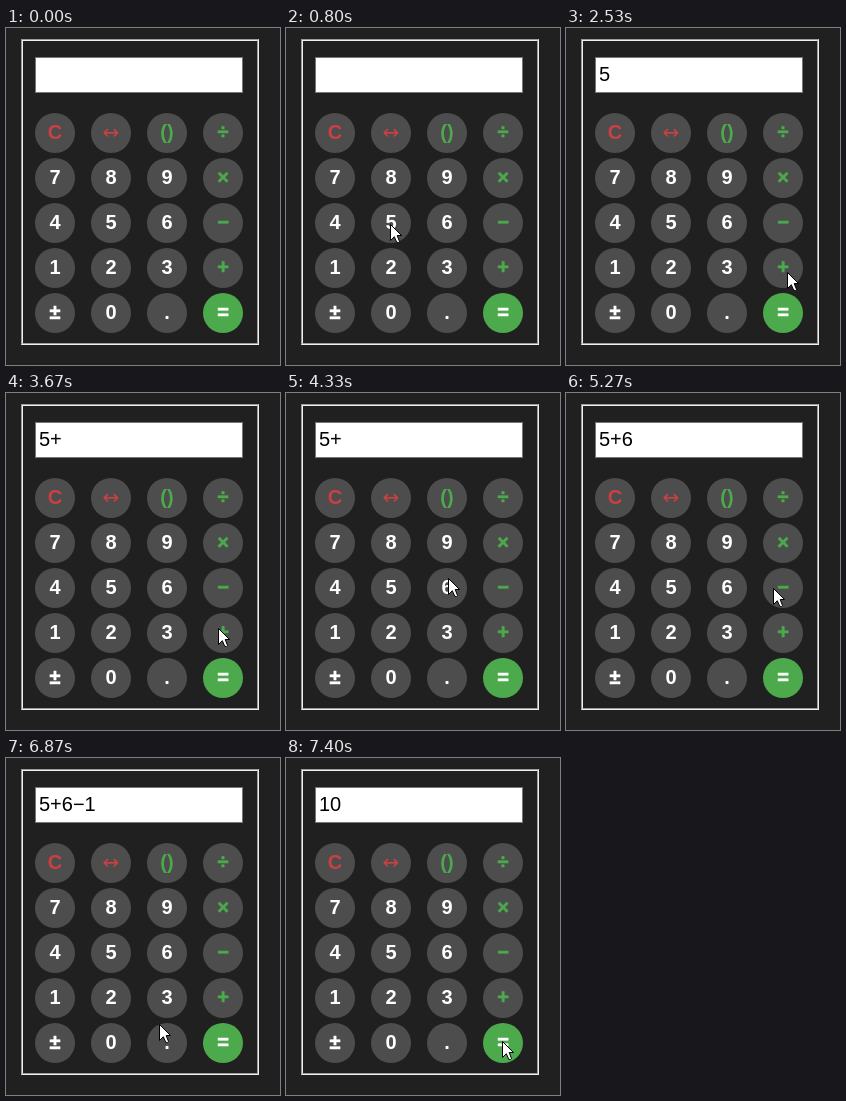
These frames come from a looping animation (274x337 px, 8 s). An HTML page:

```html
<!DOCTYPE html>
<html lang="en">
<head>
<meta charset="utf-8">
<title>Calculator</title>
<style>
  html, body { margin: 0; width: 100%; height: 100%; overflow: hidden; background: #202020; }
  body { position: relative; font: 20px Arial, "Liberation Sans", sans-serif; }
  body > *, .key { position: absolute; box-sizing: border-box; }
  #frame { left: 15px; top: 11px; width: 238px; height: 306px; border: 2px groove #f0f0f0; }
  #display {
    left: 29px; top: 29px; width: 208px; height: 36px; padding: 1px 3px;
    border: 1px solid #767676; background: #fff; color: #000; line-height: 30px; white-space: pre;
  }
  .key {
    width: 40px; height: 40px; border-radius: 50%; background: #4d4d4d; color: #fff;
    font-weight: bold; line-height: 38px; text-align: center;
  }
  .red { color: #cb4042; }
  .green { color: #4caa4c; }
  .equals { background: #4caa4c; }
  .symbol { -webkit-text-stroke: .6px; }
  .arrow { font-family: "DejaVu Sans", sans-serif; font-weight: normal; }
  #cursor { left: 0; top: 0; overflow: visible; }
</style>
</head>
<body>
<div id="frame"></div>
<div id="display"></div>
<div id="keys"></div>
<svg id="cursor" width="13" height="20">
  <path d="M.5 .5V16.5L4.3 12.7L6.8 18.4H8.6L9.5 17.5L7.2 11.5H11.5Z" fill="#fff" stroke="#000"/>
</svg>
<script>
const LOOP = 8000, TICK = 1000 / 15;
const display = document.getElementById('display');
const keys = document.getElementById('keys');
const cursor = document.getElementById('cursor');

function styleOf(label) {
  if (label === 'C') return 'red';
  if (label === '↔') return 'red arrow';
  if (label === '()') return 'green';
  if (label === '=') return 'equals symbol';
  if (label === '±') return 'symbol';
  return '÷×−+'.includes(label) ? 'green symbol' : '';
}

['C', '↔', '()', ...'÷789×456−123+±0.='].forEach((label, i) => {
  const key = document.createElement('div');
  key.className = 'key ' + styleOf(label);
  key.style.left = 29 + i % 4 * 56 + 'px';
  key.style.top = 85 + Math.floor(i / 4) * 45 + 'px';
  key.textContent = label;
  keys.append(key);
});

// The pointer glides to each key between two ticks, then a press changes the text.
// The first glide begins before the loop, so the pointer enters at full speed.
const entry = { x: 504, y: 504 };
const visits = [
  { leave: -8, arrive: 8, x: 104, y: 196, press: 28, text: '5' },
  { leave: 28, arrive: 35, x: 221, y: 244, press: 44, text: '5+' },
  { leave: 52, arrive: 64, x: 162, y: 185, press: 74, text: '5+6' },
  { leave: 73, arrive: 79, x: 207, y: 195, press: 80, text: '5+6−' },
  { leave: 80, arrive: 93, x: 48, y: 238, press: 97, text: '5+6−1' },
  { leave: 96, arrive: 108, x: 216, y: 283, press: 111, text: '10' }
];

const smooth = u => u * u * (3 - 2 * u);
const mix = (a, b, u) => Math.round(a + (b - a) * u);

function draw(time) {
  // small lead so rounded step times land on their tick
  const tick = Math.floor((time % LOOP + 4) / TICK) % 120;
  const i = visits.findLastIndex(v => v.leave <= tick);
  const to = visits[i], from = visits[i - 1] || entry;
  const u = smooth(Math.min(1, (tick - to.leave) / (to.arrive - to.leave)));
  cursor.style.transform = `translate(${mix(from.x, to.x, u)}px, ${mix(from.y, to.y, u)}px)`;

  const pressed = visits.findLast(v => v.press <= tick);
  display.textContent = pressed ? pressed.text : '';
}

const start = performance.now();
function loop() {
  draw(performance.now() - start);
  requestAnimationFrame(loop);
}
loop();
</script>
</body>
</html>
```
